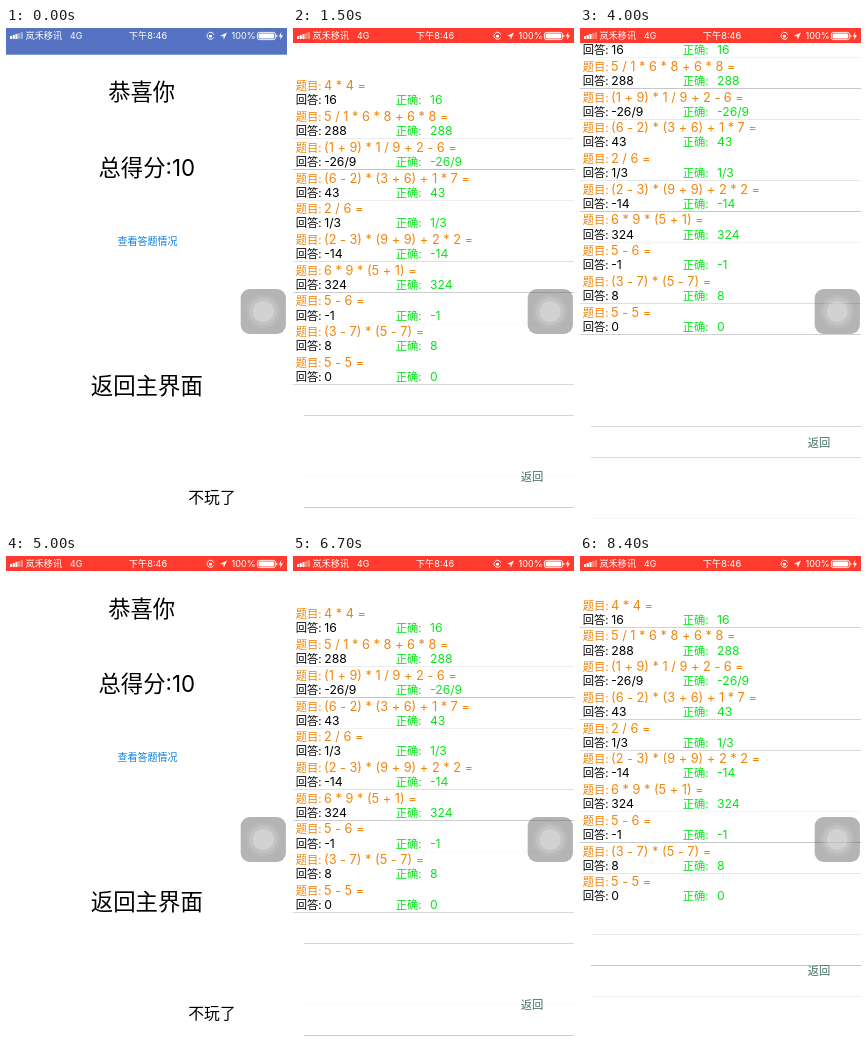
Write an HTML page with a canvas that moves like this. It is 281x500 px and loops after 8800 ms.

```html
<!DOCTYPE html>
<html lang="zh-CN">
<head>
<meta charset="utf-8">
<title>答题结果</title>
<style>
html, body { margin: 0; width: 100%; height: 100%; overflow: hidden; background: #fff; }
canvas { display: block; width: 281px; height: 500px; }
</style>
</head>
<body>
<canvas id="stage" width="281" height="500"></canvas>
<script>
const ctx = document.getElementById('stage').getContext('2d');
const W = 281, H = 500;
const LOOP = 8800, REPLAY = 5200, STEP = 100;
const SCALE = 2.668;          // device pixels per stage pixel
const SCREEN = 1334, ROW = 82, LIST_TOP = 39;
const OPEN = 1189, CLOSE = 4480;
const FONTS = 'Inter, "Noto Sans CJK SC", "Noto Sans CJK", "Noto Sans", sans-serif';
const ORANGE = '#f0860c', GREEN = '#08e41c';

const rows = [
  ['4 * 4 =', '16'],
  ['5 / 1 * 6 * 8 + 6 * 8 =', '288'],
  ['(1 + 9) * 1 / 9 + 2 - 6 =', '-26/9'],
  ['(6 - 2) * (3 + 6) + 1 * 7 =', '43'],
  ['2 / 6 =', '1/3'],
  ['(2 - 3) * (9 + 9) + 2 * 2 =', '-14'],
  ['6 * 9 * (5 + 1) =', '324'],
  ['5 - 6 =', '-1'],
  ['(3 - 7) * (5 - 7) =', '8'],
  ['5 - 5 =', '0'],
];

// Finger drag of the list: [ms, device pixels]
const drag = [
  [2900, 0], [3000, 23], [3100, 48], [3200, 69], [3500, 69], [3600, 56], [3700, 30],
  [3800, 0], [3900, -26], [4000, -42], [4100, -36], [4200, -17], [4300, -5], [4400, 0],
];

const clamp = x => Math.max(0, Math.min(1, x));
const smooth = x => x * x * (3 - 2 * x);
const mix = (a, b, p) => a + (b - a) * p;

// Critically damped spring, falling from 1 to 0
function spring(ms) {
  const x = Math.max(0, ms) * 0.014;
  return (1 + x) * Math.exp(-x);
}

function dragAt(t) {
  const i = drag.findIndex(key => key[0] >= t);
  if (i <= 0) return 0;
  const [t0, y0] = drag[i - 1], [t1, y1] = drag[i];
  return mix(y0, y1, (t - t0) / (t1 - t0));
}

function text(str, x, y, size, color, align = 'left') {
  ctx.font = `${size}px ${FONTS}`;
  ctx.textAlign = align;
  ctx.fillStyle = color;
  ctx.fillText(str, x, y);
}

function shape(color, build) {
  ctx.fillStyle = color;
  ctx.beginPath();
  build();
  ctx.fill();
}

const disc = (x, y, r, color) => shape(color, () => ctx.arc(x, y, r, 0, 7));
const roundBox = (x, y, w, h, r, color) => shape(color, () => ctx.roundRect(x, y, w, h, r));

function polygon(color, points) {
  shape(color, () => points.forEach(([x, y]) => ctx.lineTo(x, y)));
}

function drawResult(shift) {
  text('恭喜你', 135.7, 60.5 + shift, 22.3, '#000', 'center');
  text('总得分:10', 140.8, 136.3 + shift, 22.3, '#000', 'center');
  text('查看答题情况', 141.5, 205.3 + shift, 10, '#0b7fe0', 'center');
  text('返回主界面', 140.8, 354 + shift, 22.4, '#000', 'center');
  text('不玩了', 206, 463 + shift, 15.8, '#000', 'center');
}

// A one-device-pixel line, as bright as its place between stage rows allows
function hairline(n, x) {
  const y = Math.round((n - 0.834) / SCALE);
  ctx.globalAlpha = Math.max(0, 1 - Math.abs(y * SCALE + 0.834 - n));
  ctx.fillStyle = '#c2c1c5';
  ctx.fillRect(x, y, W - x, 1);
  ctx.globalAlpha = 1;
}

function drawList(slide, pull) {
  const top = LIST_TOP + Math.round(slide + pull);
  ctx.fillStyle = '#fff';
  ctx.fillRect(0, slide / SCALE, W, H);
  for (let k = 1; k <= 17; k++) hairline(top + k * ROW, k > rows.length ? 11 : 0);
  rows.forEach(([question, answer], k) => {
    const y = (top + k * ROW) / SCALE;
    text('题目:', 2.7, y + 13.2, 11.3, ORANGE);
    text(question, 31, y + 13.2, 12.75, ORANGE);
    text('回答:', 2.7, y + 27.3, 11.3, '#000');
    text(answer, 31.2, y + 27.3, 12.2, '#000');
    text('正确:', 102.7, y + 27.3, 11.3, GREEN);
    text(answer, 137, y + 27.3, 12.2, GREEN);
  });
  text('返回', 239, 418.5 + slide / SCALE, 11.3, '#3f6f5f', 'center');
}

function drawStatusBar(height, p) {
  const rgb = [mix(44, 255, p), mix(129, 59, p), mix(231, 48, p)].map(Math.round);
  ctx.fillStyle = `rgb(${rgb})`;
  ctx.fillRect(0, 0, W, height);
  for (let i = 0; i < 5; i++) {
    const h = 3 + i;
    roundBox(4 + i * 2.7, 11 - h, 2.2, h, 0.4, i < 3 ? '#fff' : 'rgba(255,255,255,.4)');
  }
  text('岚禾移讯', 19.6, 11.3, 9.1, '#fff');
  text('4G', 64, 11.2, 8.8, '#fff');
  text('下午8:46', 142, 11.3, 9.2, '#fff', 'center');
  ctx.strokeStyle = '#fff';
  ctx.lineWidth = 0.9;
  ctx.beginPath();
  ctx.arc(204.5, 7.8, 3.5, 0.5, 6);
  ctx.stroke();
  ctx.fillStyle = '#fff';
  ctx.fillRect(203, 7, 3, 2.4);
  polygon('#fff', [[214, 8], [221, 4.5], [217.8, 11.5], [217.3, 8.3]]);
  text('100%', 225.5, 11.2, 9.1, '#fff');
  ctx.beginPath();
  ctx.roundRect(251.4, 4.4, 18, 7.2, 1.8);
  ctx.stroke();
  roundBox(252.6, 5.6, 15.6, 4.8, 0.8, '#fff');
  ctx.fillRect(270.3, 6.8, 1, 2.4);
  polygon('#fff', [[275.4, 4], [272.8, 8.4], [274.6, 8.4], [273.9, 12], [277, 7.2], [275, 7.2]]);
}

function drawTouchButton() {
  roundBox(234.7, 261, 45.2, 45, 9, 'rgba(90,90,90,.45)');
  disc(257.2, 283.5, 17, 'rgba(255,255,255,.08)');
  disc(257.2, 283.5, 14, 'rgba(255,255,255,.14)');
  disc(257.2, 283.5, 10.5, 'rgba(255,255,255,.26)');
}

function draw(t) {
  const settle = smooth(clamp((t + 100) / 350));
  const shift = 14.6 * (1 - settle);
  const slide = SCREEN * (t < CLOSE ? spring(t - OPEN) : 1 - spring(t - CLOSE));
  ctx.fillStyle = '#fff';
  ctx.fillRect(0, 0, W, H);
  drawResult(shift);
  if (t >= 1200 && t < 5000) drawList(slide, dragAt(t));
  drawStatusBar(15 + shift, settle);
  drawTouchButton();
}

function frame() {
  const now = performance.now() % LOOP;
  const t = Math.floor(now / STEP) * STEP;
  draw(t % REPLAY);
  requestAnimationFrame(frame);
}
frame();
</script>
</body>
</html>
```
